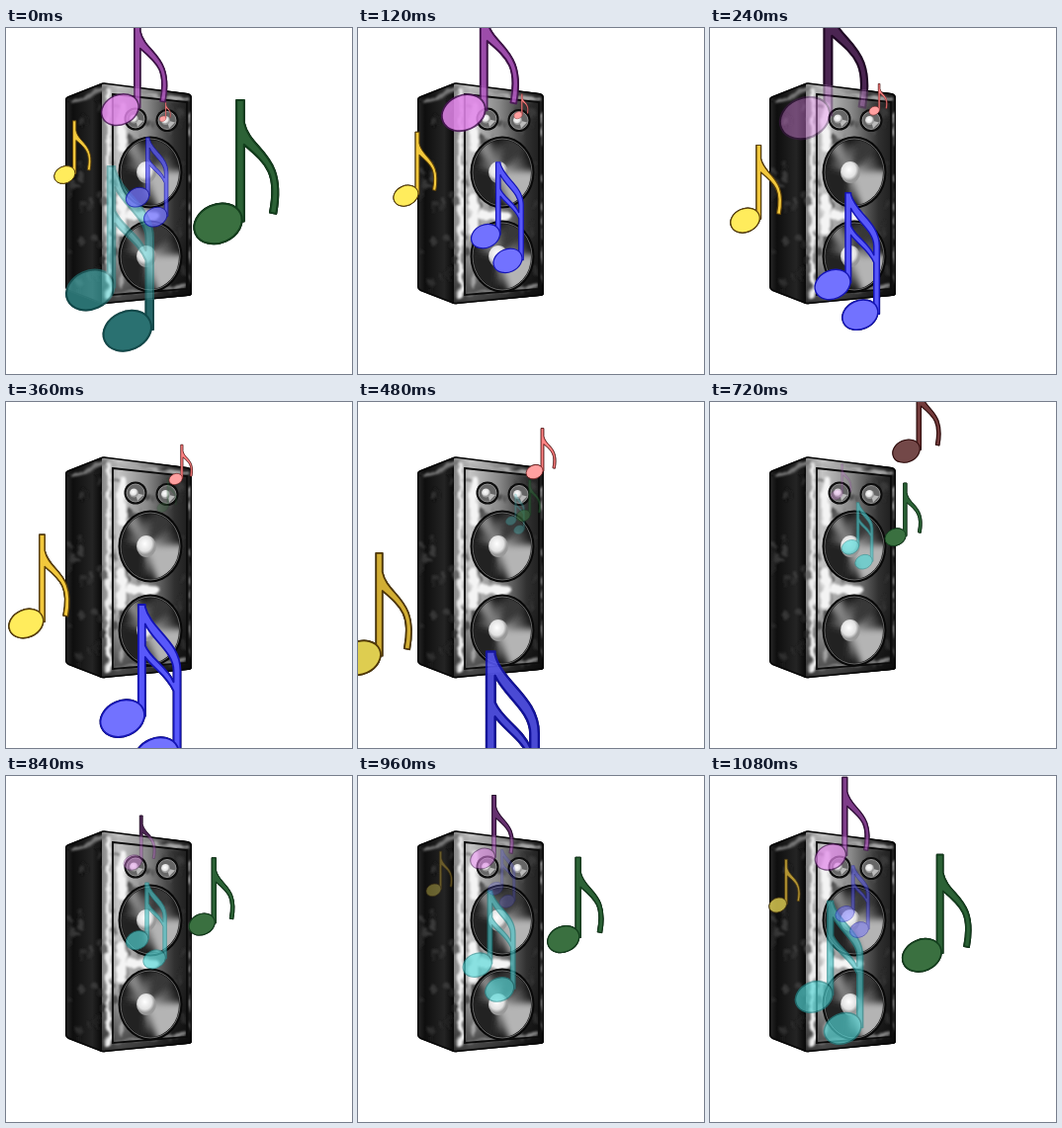
Recreate the animation shown at these times as an HTML page. Size 350 px wide and 350 px high, loop 1200 ms.

```html
<!DOCTYPE html>
<html lang="en">
<head>
<meta charset="utf-8">
<title>Loudspeaker with notes</title>
<style>
  html, body { margin: 0; width: 100%; height: 100%; overflow: hidden; background: #fff; }
  svg { display: block; width: 100vw; height: 100vh; }
</style>
</head>
<body>
<svg viewBox="0 0 350 350" xmlns="http://www.w3.org/2000/svg">
  <defs>
    <linearGradient id="side">
      <stop offset="0" stop-color="#303030"/><stop offset=".25" stop-color="#0e0e0e"/>
      <stop offset=".75" stop-color="#242424"/><stop offset="1" stop-color="#080808"/>
    </linearGradient>
    <linearGradient id="front">
      <stop offset="0" stop-color="#888"/><stop offset=".18" stop-color="#c4c4c4"/>
      <stop offset=".5" stop-color="#888"/><stop offset=".8" stop-color="#303030"/>
      <stop offset="1" stop-color="#181818"/>
    </linearGradient>
    <linearGradient id="floor" x2="0" y2="1">
      <stop offset=".65" stop-opacity="0"/><stop offset="1" stop-opacity=".7"/>
    </linearGradient>
    <radialGradient id="cone">
      <stop offset=".25" stop-color="#808080"/><stop offset=".65" stop-color="#505050"/>
      <stop offset="1" stop-color="#161616"/>
    </radialGradient>
    <radialGradient id="dome" cx=".42" cy=".38">
      <stop offset="0" stop-color="#fff"/><stop offset=".7" stop-color="#e2e2e2"/>
      <stop offset="1" stop-color="#999"/>
    </radialGradient>
    <filter id="mottle" x="0" y="0" width="350" height="350" filterUnits="userSpaceOnUse">
      <feTurbulence type="fractalNoise" baseFrequency=".09" numOctaves="2" seed="4"/>
      <feDisplacementMap in="SourceGraphic" scale="9" xChannelSelector="R" yChannelSelector="G"/>
      <feGaussianBlur stdDeviation="1.3"/>
    </filter>
    <filter id="soft" x="-50%" y="-50%" width="200%" height="200%"><feGaussianBlur stdDeviation="3"/></filter>
    <path id="outline" d="M60 73Q60 70 63 69L96 56Q98 55 101 55.500L184 66Q188 67 188 71V268Q188 271 184 271L101 279Q97 280 94 278L63 266Q60 264 60 262Z"/>
    <clipPath id="box"><use href="#outline"/></clipPath>
    <clipPath id="rim"><ellipse rx="29" ry="33"/></clipPath>
    <g id="woofer">
      <ellipse rx="32.500" ry="36.500" fill="#080808"/>
      <ellipse rx="30" ry="34" fill="url(#cone)" stroke="#888" stroke-width=".7"/>
      <g clip-path="url(#rim)" filter="url(#soft)">
        <path d="M-4 0L36-2L30 26L8 38Z" fill="#b4b4b4"/>
        <path d="M-4 0L-26-24L-14-36Z" fill="#888"/>
        <path d="M-4 0L-34-6L-26 30L-8 36Z" fill="#222"/>
        <path d="M-4 0L4-38L28-26Z" fill="#383838"/>
      </g>
      <ellipse cx="-4" rx="10" ry="11" fill="url(#dome)"/>
    </g>
    <g id="tweeter">
      <circle r="11.500" fill="#0c0c0c"/>
      <circle r="9" fill="#666" stroke="#aaa" stroke-width=".8"/>
      <path d="M0 0L8 2L2 8Z" fill="#bbb"/>
      <circle cx="-1.500" r="4.500" fill="url(#dome)"/>
    </g>
  </defs>

  <rect width="350" height="350" fill="#fff"/>
  <g id="shadows"></g>

  <g clip-path="url(#box)">
    <path d="M58 70L97 55V281L58 266Z" fill="url(#side)"/>
    <path id="face" d="M97 55L189 66V272L97 281Z" fill="url(#front)"/>
    <use href="#face" style="fill:none"/>
    <path d="M97 55L189 66V272L97 281Z" fill="url(#floor)"/>
    <g filter="url(#mottle)" fill="none" stroke-linecap="round">
      <g id="flecks"></g>
      <path d="M68 74L100 61" stroke="#777" stroke-width="4"/>
      <path d="M104 64V272" stroke="#eee" stroke-width="4"/>
      <path d="M106 63L184 73M188 86V118M188 150V258" stroke="#aaa" stroke-width="3"/>
      <path d="M117 80V122M117 172V204M126 190L152 192" stroke="#f4f4f4" stroke-width="9"/>
      <path d="M112 269L180 262" stroke="#888" stroke-width="3"/>
    </g>
    <path d="M108 67L183 75V264L108 270Z" fill="none" stroke="#0b0b0b" stroke-width="1.800"/>
    <use href="#tweeter" x="131" y="92"/>
    <use href="#tweeter" x="163" y="93.500"/>
    <use href="#woofer" x="146" y="146"/>
    <use href="#woofer" x="146" y="231"/>
    <use href="#outline" fill="none" stroke="#080808" stroke-width="3"/>
  </g>
  <g id="notes"></g>
</svg>

<script>
const STEP_MS = 120, STEPS = 10;

// Shapes have their origin at the stem top; the first head lies 100 units below.
const single = {
  stem: 'M-3 0H3V18C8 42 38 42 29 92L24 91C30 60 22 52 3 36V98H-3Z',
  heads: [[-18, 100]]
};
const double = {
  stem: 'M-3 0H3V2C8 22 34 32 34 58V132H28V76C22 62 10 56 3 46V98H-3Z' +
        'M3 17V36C8 48 22 54 28 68V58C28 42 10 32 3 17Z',
  heads: [[-17, 100], [13, 133]]
};

// Each note flies out of the speaker: its size depends on the steps left,
// its place on its size. Opacity climbs by `rise` up to `peak` and drops to `final`.
const notes = [
  { shape: double, head: '#52d8d8', stem: '#4ac4c8', edge: '#1f8a8c',
    first: 4, last: 10, rise: .3, peak: .65, final: .52,
    size: left => 1.25 * 1.29 ** -left, x: s => 174 - 54 * s, y: s => 80 + 48 * s },
  { shape: single, head: '#3a7040', stem: '#2c6236', edge: '#123d1c',
    first: 3, last: 10, rise: .3, peak: 1, final: 1,
    size: left => 1.25 * 1.23 ** -left,
    x: s => 112 + 200 * s - 80 * s * s, y: s => 66 + 48 * s - 34 * s * s },
  { shape: single, head: '#ffec5c', stem: '#f2c83c', edge: '#5c4008',
    first: 8, last: 15, rise: .35, peak: 1, final: .42,
    size: left => 1.25 * 1.18 ** -left, x: s => 120 - 93 * s, y: s => 31 + 115 * s },
  { shape: double, head: '#7272ff', stem: '#5858fa', edge: '#1414b4',
    first: 8, last: 15, rise: .25, peak: 1, final: .4,
    size: left => 1.77 * 1.24 ** -left, x: s => 150 - 11 * s, y: s => 7 + 172 * s },
  { shape: single, head: '#ffa0a0', stem: '#ff8484', edge: '#6a1818',
    first: 10, last: 16, rise: 1, peak: 1, final: .45,
    size: left => .71 * 1.27 ** -left, x: s => 146 + 92 * s, y: s => 105 - 178 * s },
  { shape: single, head: '#e084e8', stem: '#b458c4', edge: '#4a1456',
    first: 5, last: 12, rise: .14, peak: 1, final: .42,
    size: left => 1.3 - .165 * left,
    x: s => 122 + 50 * s - 40 * s * s, y: s => 112 - 172 * s + 43 * s * s }
];

function svg(tag, attrs, parent) {
  const node = document.createElementNS('http://www.w3.org/2000/svg', tag);
  for (const name in attrs) node.setAttribute(name, attrs[name]);
  parent.append(node);
  return node;
}

function seeded(seed) {
  return () => (seed = seed * 16807 % 2147483647) / 2147483647;
}

function scatterFlecks(count) {
  const random = seeded(11);
  const parent = document.getElementById('flecks');
  for (let i = 0; i < count; i++) {
    const x = 62 + 124 * random(), y = 66 + 204 * random();
    const onSide = x < 98;
    const grey = onSide ? 20 + 55 * random() : 40 + 190 * random() * (188 - x) / 90;
    svg('ellipse', {
      cx: x, cy: y, rx: 1 + 3 * random(), ry: 2 + 5 * random(),
      fill: `rgb(${grey},${grey},${grey})`, opacity: .7
    }, parent);
  }
}

function drawNote(shape, head, stem, edge, parent) {
  const group = svg('g', { stroke: edge, 'stroke-width': 1.6, 'stroke-linejoin': 'round' }, parent);
  svg('path', { d: shape.stem, fill: stem }, group);
  for (const [x, y] of shape.heads) {
    svg('ellipse', { rx: 20, ry: 15.5, fill: head, transform: `translate(${x} ${y}) rotate(-24)` }, group);
  }
  return group;
}

function render(ms) {
  const step = Math.floor(ms / STEP_MS) % STEPS;
  for (const note of notes) {
    const age = (step - note.first + 2 * STEPS) % STEPS;
    const left = note.last - note.first - age;
    const s = note.size(left);
    for (const node of [note.shadow, note.body]) {
      node.style.display = left < 0 ? 'none' : '';
      node.setAttribute('transform', `translate(${note.x(s)} ${note.y(s)}) scale(${s})`);
    }
    note.body.setAttribute('opacity',
      Math.min(note.peak, note.rise * (age + 1), note.final + .45 * Math.max(0, left)));
  }
}

scatterFlecks(110);
for (const note of notes) {
  // Fading notes darken off the speaker and turn translucent over it.
  note.shadow = drawNote(note.shape, '#000', '#000', '#000', document.getElementById('shadows'));
  note.body = drawNote(note.shape, note.head, note.stem, note.edge, document.getElementById('notes'));
}

const start = performance.now();
function tick() {
  render(performance.now() - start);
  requestAnimationFrame(tick);
}
tick();
</script>
</body>
</html>
```
